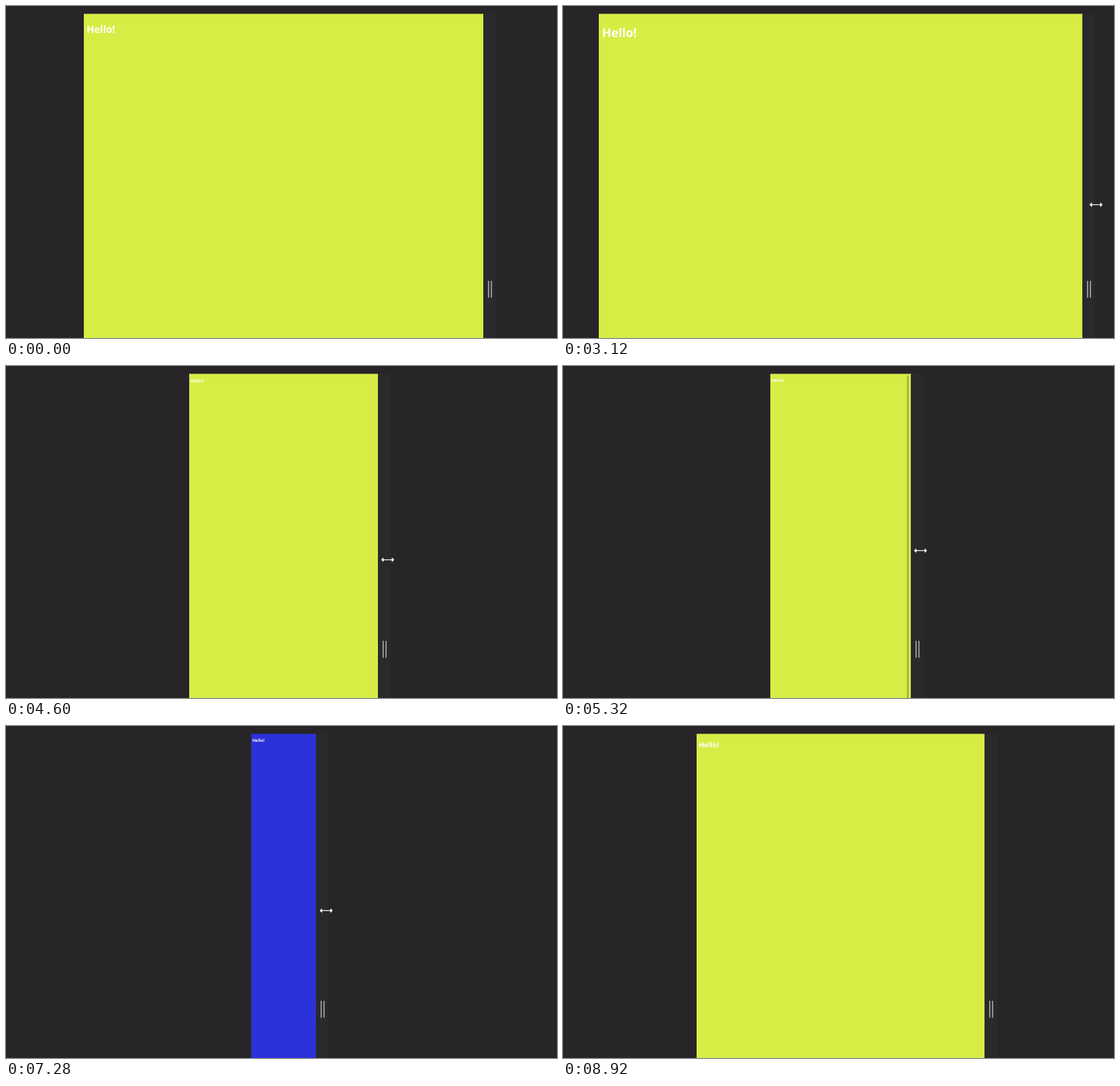
These frames come from a looping animation (800 by 482 pixels, 9000 ms). An HTML page:

```html
<!DOCTYPE html>
<html lang="en">
<head>
<meta charset="utf-8">
<title>Resizing a viewport</title>
<style>
  html, body { margin: 0; width: 100%; height: 100%; overflow: hidden; background: #272528; }
  svg { display: block; width: 100%; height: 100%; }
  text { font-family: "Open Sans", "Noto Sans", sans-serif; font-weight: 700; fill: #fff; text-rendering: geometricPrecision; }
</style>
</head>
<body>
<svg viewBox="0 0 800 482">
  <rect width="800" height="482" fill="#272528"/>
  <rect id="page" y="11.4" height="472"/>
  <text id="hello">Hello!</text>
  <rect id="bar" y="14" width="2.6" height="470" fill="#70803c" opacity="0"/>
  <g id="gutter">
    <rect y="11.4" width="18.6" height="472" fill="#2a292b"/>
    <rect id="glow" y="11.4" width="18.6" height="472" fill="#424142" opacity="0"/>
    <path d="M7.6 399V423.5M11.7 399V423.5" stroke="#b4b4b4" stroke-width="1.5"/>
  </g>
  <g fill="#fff" stroke="#1c1c1c" stroke-width=".9" stroke-linejoin="round">
    <path id="resize" d="M-10 0L-5.6 -4.4V-1.1H5.6V-4.4L10 0L5.6 4.4V1.1H-5.6V4.4Z"/>
    <path id="arrow" d="M0 0V16.4L3.8 12.8L6.3 18.5L8.8 17.4L6.3 11.9H11.6Z"/>
  </g>
</svg>
<script>
const LOOP = 9000, STEP = 40, TOP = 11.4;
const AXIS = 806;        // left edge + right edge of the centred page
const BREAKPOINT = 120, MIN_LAYOUT = 245;
const GRAB = 15.3;       // pointer's distance from the page edge while dragging
const LEAD = 20;         // ms the page trails behind the pointer
const GRIP = 2240, RELEASE = 8640, GONE = 8800;

// Each move: start, end, destination
const drags = [
  [2680, 3520, 808], [3760, 4650, 538], [4870, 5700, 481],
  [6640, 7400, 448], [8060, 8830, 612]
];
const acrossMoves = [[40, 560, 285], [920, 960, 707], [1160, 1280, 760], [1920, GRIP, 708]];
const downMoves = [
  [40, 560, 34], [920, 960, 188], [1160, 1280, 250],
  [1920, GRIP, 288.5], [4200, 5200, 268], [7700, 8400, 251]
];

const $ = id => document.getElementById(id);
const set = (id, attrs) => { for (const k in attrs) $(id).setAttribute(k, attrs[k]); };
const show = on => on ? "visible" : "hidden";
const ramp = (t, from, to) => Math.min(1, Math.max(0, (t - from) / (to - from)));
const ease = u => u * u * (3 - 2 * u);

const follow = (t, first, moves) =>
  moves.reduce((at, [from, to, goal]) => at + (goal - at) * ease(ramp(t, from, to)), first);

const edgeAt = t => follow(t, 693, drags);

function pointerX(t) {
  if (t < GRIP) return follow(t, 17, acrossMoves);
  const held = edgeAt(Math.min(t, RELEASE) + LEAD) + GRAB;
  return held + (769 - held) * ramp(t, RELEASE, GONE);
}

function drawPointer(t) {
  const x = pointerX(t), y = follow(t, 14, downMoves);
  const shown = t >= 40 && t <= GONE;
  const overGutter = t < RELEASE && Math.abs(x - edgeAt(t) - 10) < 12;
  const sizing = overGutter || (t >= GRIP && t < RELEASE);
  const transform = `translate(${x} ${y})`;
  set("resize", { transform, visibility: show(shown && sizing) });
  set("arrow", { transform, visibility: show(shown && !sizing) });
}

function draw(t) {
  const edge = edgeAt(t), right = Math.round(edge), left = Math.ceil(AXIS - edge);
  const width = right - left, scale = Math.max(width, MIN_LAYOUT) / 580;
  set("page", { x: left, width, fill: width < BREAKPOINT ? "#2c32d9" : "#d7ed45" });
  set("hello", { x: left + 4 * scale, y: TOP + 27.6 * scale, "font-size": 14.4 * scale });
  const overflow = width < MIN_LAYOUT && t < 5640;
  set("bar", { x: right - 6.6, opacity: overflow ? 0.55 * (1 - ramp(t, 5480, 5640)) : 0 });
  set("gutter", { transform: `translate(${Math.floor(edge)} 0)` });
  set("glow", { opacity: t < 2720 ? ramp(t, 2040, 2160) : 0 });
  drawPointer(t);
}

const start = performance.now();
function tick() {
  const t = (performance.now() - start) % LOOP;
  draw(Math.floor(t / STEP) * STEP);
  requestAnimationFrame(tick);
}
tick();
</script>
</body>
</html>
```
